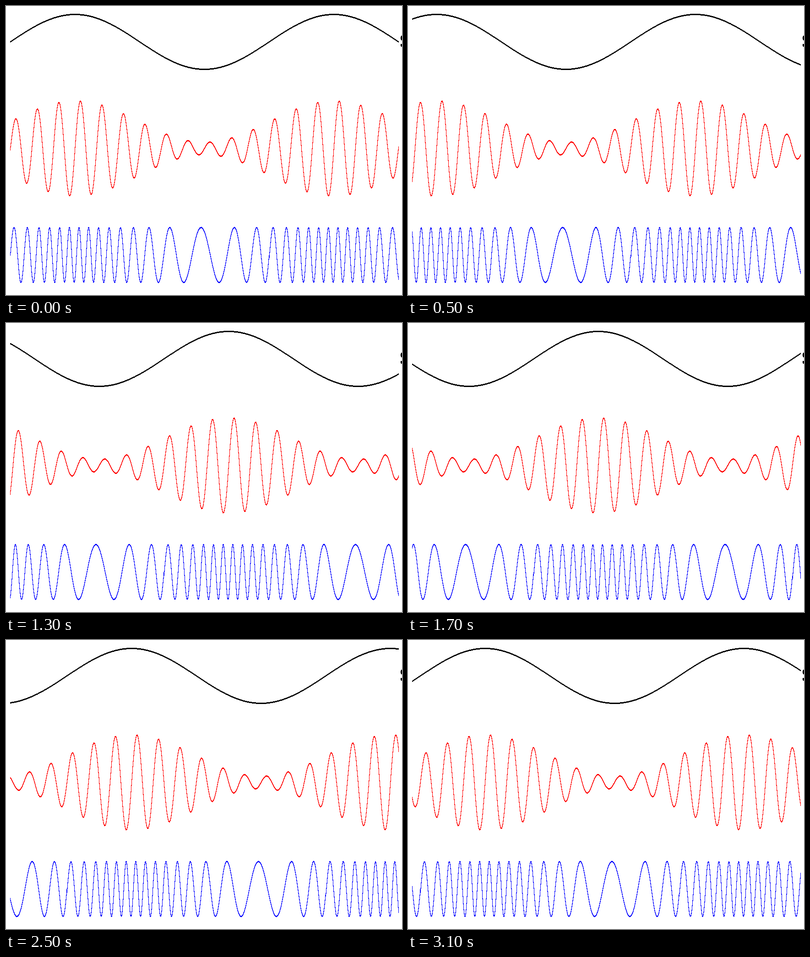
A matplotlib script for the animation above (3.2 s loop, 865 by 632 pixels).

```python
import numpy as np
import matplotlib.pyplot as plt
from matplotlib.animation import FuncAnimation
from matplotlib.patches import Rectangle

W, H, DPI = 865, 632, 100
FRAMES, INTERVAL = 32, 100
LEFT, RIGHT = 9, 858
TURN = 2 * np.pi
PERIOD = 848 / 1.5      # signal wavelength in pixels
CARRIER = 12            # AM carrier cycles per signal period
FM_MEAN, FM_SWING = 17, 10
FM_SLIP = 0.13          # phase lost with each signal period

fig = plt.figure(figsize=(W / DPI, H / DPI), dpi=DPI, facecolor="white")
ax = fig.add_axes([0, 0, 1, 1])
ax.axis("off")

edges = np.arange(LEFT, RIGHT + 1)
# Several samples inside each pixel column, to find the rows the curve crosses
xs = edges[:-1, None] + np.linspace(0, 1, 7)


def signal(a):
    return 78.5 - 60 * np.sin(a)


def am(a):
    return 311.5 - (58.75 + 45.2 * np.sin(a)) * np.sin(CARRIER * a)


def fm(a):
    phase = FM_MEAN * a + FM_SWING * (1 - np.cos(a))
    return 544.5 - 60 * np.sin(phase - FM_SLIP * np.floor(a / TURN))


def rows(curve, frame):
    """Top and bottom of the stroke in every column, on whole pixels."""
    y = curve(TURN * ((xs - LEFT - 0.5) / PERIOD + frame / FRAMES))
    low, high = y.min(axis=1), y.max(axis=1)
    mid = (low + high) / 2
    half = np.maximum((high - low) / 2, 0.5)
    return np.floor(mid - half + 0.5) - 1, np.floor(mid + half + 0.5) + 1


def add_wave(curve, color):
    top, bottom = rows(curve, 0)
    patch = ax.stairs(bottom, edges, baseline=top, fill=True,
                      color=color, linewidth=0, snap=True)
    return patch, curve


waves = [add_wave(signal, "#000000"),
         add_wave(am, "#ff0000"),
         add_wave(fm, "#0000ff")]

# Left tip of a letter cut off by the right border
for x, y, h in [(862, 67, 6), (863, 65, 10), (862, 83, 5), (863, 83, 6)]:
    ax.add_patch(Rectangle((x, y), W - x, h, color="black", linewidth=0))

ax.set_xlim(0, W)
ax.set_ylim(H, 0)


def update(frame):
    for patch, curve in waves:
        top, bottom = rows(curve, frame)
        patch.set_data(values=bottom, baseline=top)
    return [patch for patch, _ in waves]


anim = FuncAnimation(fig, update, frames=FRAMES, interval=INTERVAL,
                     repeat=True, repeat_delay=0, blit=False)
plt.show()
```
